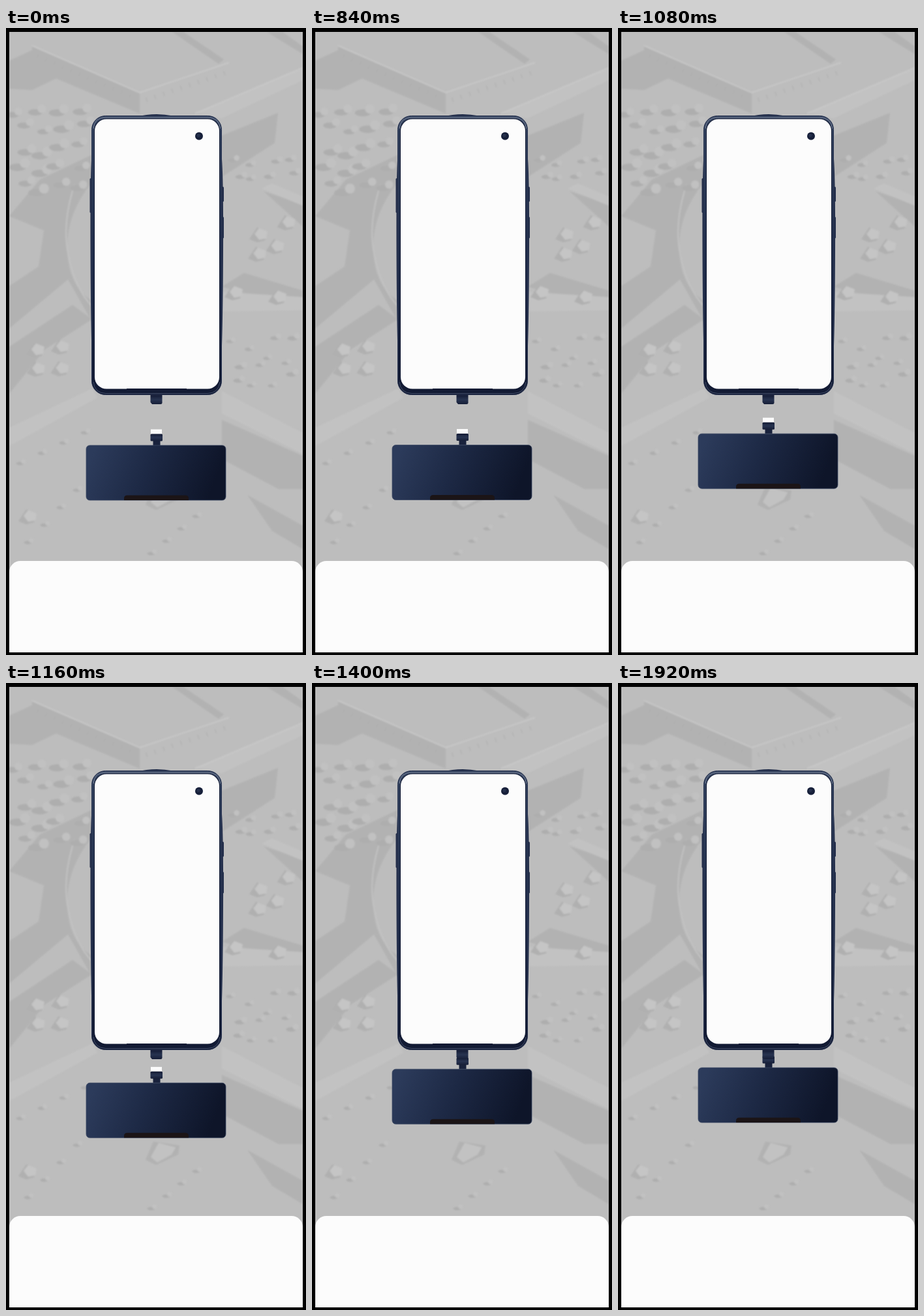
Write an HTML page that moves like this. It is 460 px wide and 960 px high and loops after 2520 ms.

```html
<!DOCTYPE html>
<html lang="en">
<head>
<meta charset="utf-8">
<title>Plug in</title>
<style>
  html, body { margin: 0; height: 100%; overflow: hidden; background: #000; }
  svg { display: block; width: 460px; height: 960px; }
</style>
</head>
<body>
<svg viewBox="0 0 460 960">
  <defs>
    <clipPath id="stage"><rect x="5" y="6" width="450" height="950"/></clipPath>
    <filter id="soft" x="0" y="0" width="1" height="1"><feGaussianBlur stdDeviation=".9"/></filter>
    <linearGradient id="body" x2="0" y2="1">
      <stop stop-color="#34435f"/><stop offset=".5" stop-color="#202d4b"/><stop offset="1" stop-color="#121a33"/>
    </linearGradient>
    <linearGradient id="pack" gradientUnits="userSpaceOnUse" x1="135" y1="645" x2="312" y2="715">
      <stop stop-color="#2c3b5b"/><stop offset=".45" stop-color="#1d2945"/><stop offset="1" stop-color="#0e1529"/>
    </linearGradient>
    <linearGradient id="plug" x2="0" y2="1">
      <stop stop-color="#141b34"/><stop offset=".5" stop-color="#273350"/><stop offset="1" stop-color="#161e37"/>
    </linearGradient>
  </defs>

  <g clip-path="url(#stage)">
    <rect width="460" height="960" fill="#bdbdbd"/>
    <g filter="url(#soft)">
      <!-- streets and shadows -->
      <g fill="#b2b2b2">
        <path d="M5 288L52 232 132 194V236Q92 285 94 340T132 418V450L95 385 5 460V395L50 365 58 310Z"/>
        <path d="M330 165L417 130 412 176 331 228Z"/>
        <path d="M5 50L40 34 88 72 40 95 5 93Z"/>
        <path d="M5 488L102 424 132 446 60 492 5 560Z"/>
        <path d="M331 600L455 655V706H418L331 660Z"/>
        <path d="M370 715L455 762V798L408 770Z"/>
        <path d="M331 396L365 375 455 402V432Z"/>
        <path d="M395 250L455 270V304Z"/>
        <path d="M40 26L205 98V131L40 62Z"/>
        <path d="M255 6H272L334 48 326 55ZM400 6H424L455 28V40Z"/>
        <path d="M214 730L226 702 266 708 264 722 230 738Z"/>
      </g>
      <!-- roofs and lit ground -->
      <g fill="#c2c2c2">
        <path d="M290 130L455 62V80L331 138Z"/>
        <path d="M331 404L455 412V432L331 434Z"/>
        <path d="M5 612L132 552 140 566 5 640Z"/>
        <path d="M331 556L455 620V652L331 590Z"/>
        <path d="M392 246L408 238 455 258V272Z"/>
        <path d="M222 726L234 704 260 711 254 722 232 734Z"/>
      </g>
      <g fill="none">
        <path d="M40 27L205 99 342 53M290 131L455 61" stroke="#c7c7c7" stroke-width="2"/>
        <path d="M48 43L202 109M215 110L338 68" stroke="#adadad" stroke-width="7" stroke-dasharray="1 13"/>
        <path d="M105 240Q85 300 96 350T131 425" stroke="#c2c2c2" stroke-width="2"/>
      </g>
      <g id="city"></g>
    </g>
    <rect x="5" y="816" width="450" height="160" rx="17" fill="#fcfcfc"/>
  </g>

  <g id="charger">
    <rect x="222" y="614.5" width="17" height="9" fill="#fbfbfb"/>
    <rect x="225.500" y="630" width="11" height="9" fill="#19223c"/>
    <rect x="221.500" y="621.500" width="18.500" height="11" rx="1.500" fill="url(#plug)"/>
    <rect x="123" y="639" width="214" height="84" rx="5.500" fill="url(#pack)" stroke="#3c4862" stroke-width=".8"/>
    <path d="M181 723V720Q181 715.500 186 715.500H275Q280 715.500 280 720V723Z" fill="#1b1416"/>
  </g>

  <g id="phone">
    <path d="M221.500 562H239.500V574Q239.500 576 237 576H224L221.500 573Z" fill="url(#plug)"/>
    <g fill="#242f4b">
      <rect x="128.500" y="230" width="4" height="53" rx="1.500"/>
      <rect x="330" y="243" width="4" height="23" rx="1.500"/>
      <rect x="330" y="289" width="4" height="33" rx="1.500"/>
      <path d="M200 136Q231 128 262 136Z"/>
      <path d="M132 190Q129 215 129.500 340T132 510ZM330 190Q333.500 215 333 340T330 510Z"/>
    </g>
    <rect x="131.500" y="134.500" width="199" height="427" rx="21" fill="url(#body)" stroke="#27324f"/>
    <path d="M134 154Q135 137 153 137H309Q327 137 328.500 154" fill="none" stroke="#7c869b"/>
    <path d="M134 542Q136 559 153 559.500H309Q326 559 328 542" fill="none" stroke="#4c5874" stroke-width=".8"/>
    <rect x="135" y="138.500" width="193" height="415.500" rx="19" fill="#121a33"/>
    <rect x="136" y="139.500" width="191" height="413" rx="18" fill="#fcfcfc"/>
    <path d="M185 554V552H277V554Z" fill="#121a33"/>
    <circle cx="296" cy="165.500" r="6" fill="#17203a"/>
    <circle cx="295" cy="164.500" r="2.500" fill="#25304c"/>
  </g>
</svg>
<script>
  const city = document.getElementById('city');
  const charger = document.getElementById('charger');

  let seed = 7;
  const random = () => (seed = seed * 16807 % 2147483647) / 2147483647;

  const tree = (x, y, r) =>
    `<ellipse cx="${x - r}" cy="${y + r / 2}" rx="${r * 1.7}" ry="${r * .75}" fill="#aeaeae"/>
     <circle cx="${x + r / 2}" cy="${y - r / 3}" r="${r}" fill="#c1c1c1"/>`;

  const house = (x, y) =>
    `<g transform="translate(${x} ${y})">
       <path d="M-15 8L-3-10 13-4 9 10-3 13Z" fill="#b0b0b0"/>
       <path d="M-7 0L0-9 13-4 11 7 0 9Z" fill="#c5c5c5"/>
     </g>`;

  // Scatter parts over a jittered grid
  function scatter(part, x, y, cols, rows, gap, size) {
    let out = '';
    for (let i = 0; i < cols * rows; i++) {
      const px = x + (i % cols + random() * .7) * gap;
      const py = y + (Math.floor(i / cols) + random() * .7) * gap;
      out += part(px, py, size * (.8 + random() * .4));
    }
    return out;
  }

  // Plant trees evenly along a line
  function row(x1, y1, x2, y2, count) {
    let out = '';
    for (let i = 0; i < count; i++) {
      const k = i / (count - 1);
      out += tree(x1 + (x2 - x1) * k, y1 + (y2 - y1) * k, 3.5);
    }
    return out;
  }

  city.innerHTML =
    scatter(tree, 16, 110, 4, 5, 31, 6.5) +
    scatter(tree, 345, 190, 4, 2, 28, 4) +
    scatter(tree, 345, 470, 4, 3, 29, 4) +
    scatter(house, 372, 292, 2, 2, 36) +
    scatter(house, 45, 478, 2, 2, 26) +
    house(350, 404) + house(417, 411) + house(34, 747) +
    row(112, 706, 37, 786, 4) + row(295, 746, 226, 803, 4) + row(124, 618, 25, 665, 4);

  const LOOP = 2520, STEP = 40, START = 795, LENGTH = 700, RISE = 50;
  const easeSine = u => (1 - Math.cos(Math.PI * u)) / 2;

  function draw(now) {
    const t = Math.floor(now % LOOP / STEP) * STEP;
    const u = Math.min(1, Math.max(0, (t - START) / LENGTH));
    charger.setAttribute('transform', `translate(0 ${-RISE * easeSine(u)})`);
    requestAnimationFrame(draw);
  }
  requestAnimationFrame(draw);
</script>
</body>
</html>
```
